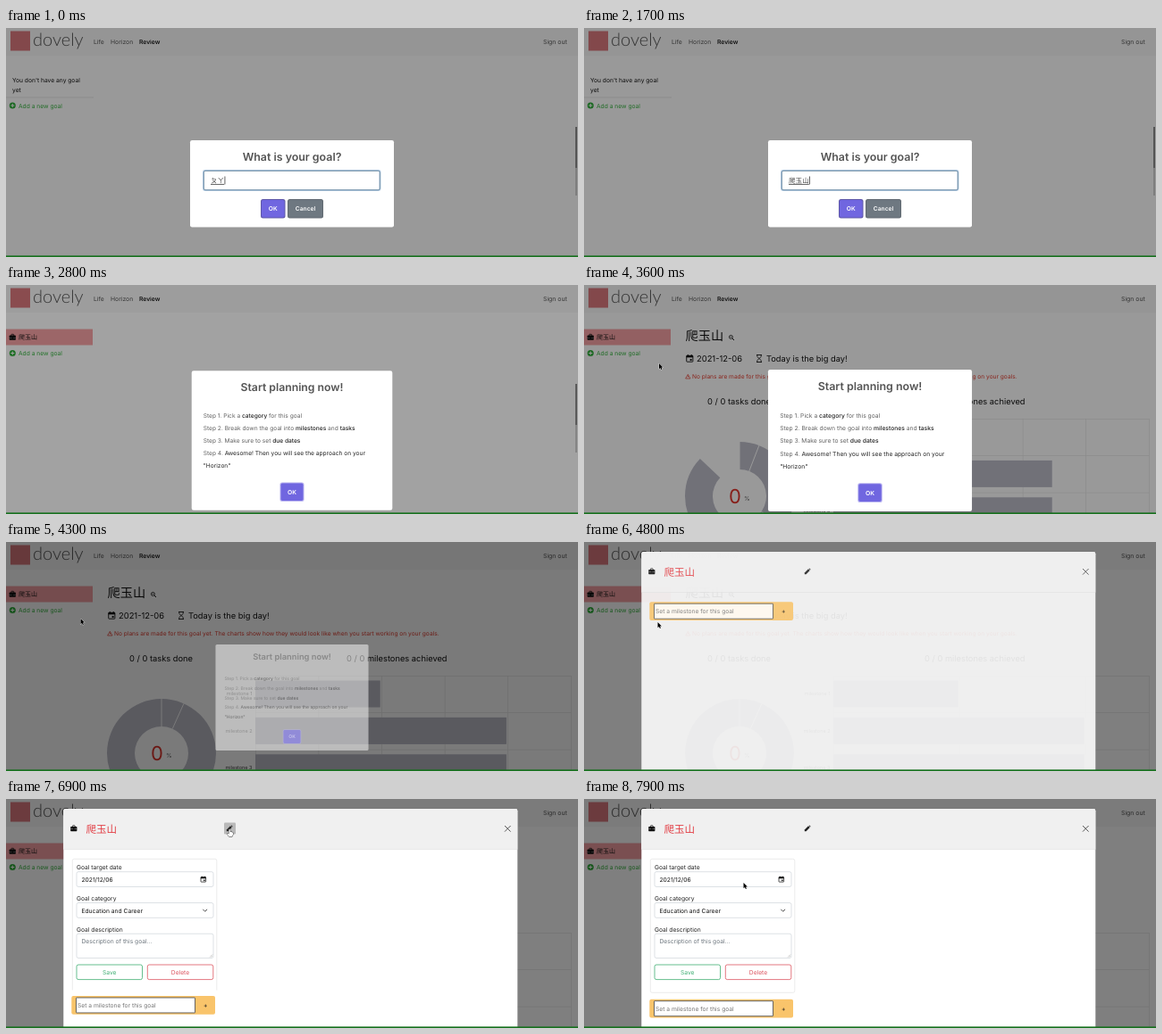
Recreate the animation shown at these times as an HTML page with a canvas. Size 640 px wide and 257 px high, loop 8000 ms.

```html
<!DOCTYPE html>
<html lang="en">
<head>
<meta charset="utf-8">
<title>Goal planner</title>
<style>
html, body { margin: 0; width: 100%; height: 100%; overflow: hidden; background: #fff; }
canvas { display: block; width: 640px; height: 257px; }
</style>
</head>
<body>
<canvas id="stage"></canvas>
<script>
const W = 640, H = 257, LOOP = 8000;
const canvas = document.getElementById('stage');
const ctx = canvas.getContext('2d');
const dpr = window.devicePixelRatio || 1;
canvas.width = W * dpr;
canvas.height = H * dpr;

const SANS = 'Inter, "Noto Sans CJK TC", "Noto Sans CJK SC", "Noto Sans CJK JP", "Noto Sans CJK", sans-serif';
const GOAL = '爬玉山';
const PURPLE = '#7066e0';

// ---------- timing ----------
const clamp = v => Math.max(0, Math.min(1, v));
const lerp = (a, b, k) => a + (b - a) * k;
const span = (t, from, to) => clamp((t - from) / (to - from));
const outQuart = k => 1 - Math.pow(1 - k, 4);

// CSS "ease", solved by bisection
function ease(x) {
  if (x <= 0 || x >= 1) return clamp(x);
  const bez = (s, a, b) => 3 * (1 - s) * (1 - s) * s * a + 3 * (1 - s) * s * s * b + s * s * s;
  let lo = 0, hi = 1;
  for (let i = 0; i < 20; i++) {
    const mid = (lo + hi) / 2;
    if (bez(mid, .25, .25) < x) lo = mid; else hi = mid;
  }
  return bez(lo, .1, 1);
}

const CLOSE_ASK = 2530, OPEN_STEPS = 2626, SHOW_CHARTS = 3200;
const CLOSE_STEPS = 4257, OPEN_MODAL = 4450, EXPAND = 6620;

// ---------- drawing helpers ----------
function text(str, x, y, size, color, { weight = 400, align = 'left', family = SANS } = {}) {
  ctx.font = `${weight} ${size}px ${family}`;
  ctx.fillStyle = color;
  ctx.textAlign = align;
  ctx.fillText(str, x, y);
  return ctx.measureText(str).width;
}

function rect(x, y, w, h, color) {
  ctx.fillStyle = color;
  ctx.fillRect(x, y, w, h);
}

function box(x, y, w, h, r, fill, stroke, line = .7) {
  ctx.beginPath();
  ctx.roundRect(x, y, w, h, r);
  if (fill) { ctx.fillStyle = fill; ctx.fill(); }
  if (stroke) { ctx.strokeStyle = stroke; ctx.lineWidth = line; ctx.stroke(); }
}

function path(points, color, width, close) {
  ctx.beginPath();
  points.forEach(([x, y], i) => i ? ctx.lineTo(x, y) : ctx.moveTo(x, y));
  if (close) ctx.closePath();
  ctx.strokeStyle = color;
  ctx.lineWidth = width;
  ctx.stroke();
}

function poly(points, fill, stroke, width = .6) {
  path(points, stroke || fill, stroke ? width : .01, true);
  ctx.fillStyle = fill;
  ctx.fill();
}

function at(x, y, scale, draw) {
  ctx.save();
  ctx.translate(x, y);
  ctx.scale(scale, scale);
  draw();
  ctx.restore();
}

// ---------- icons, centred on x, y ----------
function briefcase(x, y) {
  at(x, y, 1, () => {
    box(-1.4, -3.2, 2.8, 2, .5, null, '#111', .8);
    box(-3.6, -2, 7.2, 5.2, .7, '#111');
    rect(-3.6, .5, 2.8, .5, '#999');
    rect(.8, .5, 2.8, .5, '#999');
  });
}

function calendar(x, y, s) {
  at(x, y, s, () => {
    box(-3.1, -2.8, 6.2, 6, .5, null, '#111', .8);
    rect(-3.2, -3, 6.4, 2, '#111');
    rect(-2.2, -3.9, .9, 1.2, '#111');
    rect(1.3, -3.9, .9, 1.2, '#111');
    rect(.3, .4, 1.7, 1.7, '#111');
  });
}

function pencil(x, y) {
  at(x, y, 1, () => {
    poly([[-3.2, 3.2], [-3.2, 1.5], [1, -2.7], [2.7, -1], [-1.5, 3.2]], '#222');
    poly([[1.5, -3.1], [2.3, -3.6], [3.6, -2.3], [3.1, -1.5]], '#222');
  });
}

function hourglass(x, y) {
  path([[x - 3, y - 4], [x + 3, y - 4]], '#111', .9);
  path([[x - 3, y + 4], [x + 3, y + 4]], '#111', .9);
  path([[x - 2.2, y - 4], [x - 2.2, y - 2], [x + 2.2, y + 2], [x + 2.2, y + 4]], '#111', .8);
  path([[x + 2.2, y - 4], [x + 2.2, y - 2], [x - 2.2, y + 2], [x - 2.2, y + 4]], '#111', .8);
}

function magnifier(x, y) {
  ctx.beginPath();
  ctx.arc(x - .6, y - .6, 2, 0, 7);
  ctx.strokeStyle = '#111';
  ctx.lineWidth = .8;
  ctx.stroke();
  path([[x + .9, y + .9], [x + 3, y + 3]], '#111', 1);
  path([[x - 1.6, y - .6], [x + .4, y - .6]], '#111', .6);
}

function addGoal(y) {
  ctx.beginPath();
  ctx.arc(7.3, y, 3.5, 0, 7);
  ctx.fillStyle = '#2fae3a';
  ctx.fill();
  path([[5.3, y], [9.3, y]], '#fff', 1);
  path([[7.3, y - 2], [7.3, y + 2]], '#fff', 1);
  text('Add a new goal', 14, y + 2.6, 6.7, '#35b23f');
}

// ---------- page ----------
function navbar() {
  rect(0, 0, W, 31, '#f7f7f7');
  rect(5, 3.5, 22, 22, '#d9777c');
  text('dovely', 30, 19.8, 20, '#555', { weight: 300, family: 'Lato, sans-serif' });
  text('Life', 98, 17.5, 6.8, '#555');
  text('Horizon', 117, 17.5, 6.8, '#555');
  text('Review', 149, 17.5, 6.8, '#000', { weight: 500 });
  text('Sign out', 601, 17.5, 6.9, '#555');
}

function scrollbar() {
  rect(637, 111, 2, 77, '#cfcfcf');
  rect(637, 111, 2, 46, '#8c8c8c');
}

function sidebar(t) {
  if (t < OPEN_STEPS - 10) {
    text("You don't have any goal", 7, 61, 6.7, '#111');
    text('yet', 7, 72, 6.7, '#111');
    rect(0, 77.6, 98, .7, '#dcdcdc');
    addGoal(87);
  } else {
    rect(0, 49.5, 97, 18, '#f5a0a3');
    briefcase(7.3, 58.5);
    text(GOAL, 14, 61, 7, '#111');
    addGoal(76.5);
  }
}

const CHART = '#bcbcc8';

function donut(k) {
  const x = 174, y = 237, start = -Math.PI / 2, sweep = k * Math.PI * 2;
  ctx.beginPath();
  ctx.arc(x, y, 61, start, start + sweep);
  ctx.arc(x, y, 30, start + sweep, start, true);
  ctx.fillStyle = CHART;
  ctx.fill();
  for (const part of [0, .067, .4]) {
    const a = start + part * sweep, c = Math.cos(a), s = Math.sin(a);
    path([[x + 30 * c, y + 30 * s], [x + 61 * c, y + 61 * s]], '#fff', 1);
  }
  text('0', 162, 244.5, 22, '#e0342c');
  text('%', 179, 242, 6.8, '#666');
}

function bars(k) {
  const left = 279, step = 70.6, row = 41.4;
  for (let i = 0; i < 6; i++) rect(left + i * step, 150, .6, 107, '#e3e3e3');
  for (let i = 0; i < 3; i++) rect(left, 150 + i * row, step * 5, .6, '#e3e3e3');
  [2, 4, 4].forEach((units, i) => {
    rect(left, 155.5 + i * row, (units * step - 1.5) * k, 30, CHART);
    text('milestone ' + (i + 1), 275.5, 172.3 + i * row, 5.5, '#444', { align: 'right' });
  });
}

function goalPage(t) {
  const k = outQuart(span(t, SHOW_CHARTS, SHOW_CHARTS + 1000));
  text(GOAL, 113.5, 62, 14.2, '#111', { weight: 300 });
  magnifier(165, 59);
  calendar(118.3, 82.5, 1.15);
  text('2021-12-06', 126, 86, 9.4, '#111');
  hourglass(196, 82.5);
  text('Today is the big day!', 204, 86, 9.3, '#111');
  path([[113.6, 105], [116.3, 100.3], [119, 105]], '#e23b2e', .7, true);
  rect(116, 101.8, .7, 1.6, '#e23b2e');
  text('No plans are made for this goal yet. The charts show how they would look like when you start working on your goals.',
    121, 105, 6.6, '#e23b2e');
  text('0 / 0 tasks done', 138, 134, 9.3, '#111');
  text('0 / 0 milestones achieved', 381, 134, 9.3, '#111');
  donut(k);
  bars(k);
}

// ---------- dialogs ----------
function button(label, x, y, w, color, ring) {
  if (ring) box(x - 1, y - 1, w + 2, 21.5, 2.5, ring);
  box(x, y, w, 19.5, 1.8, color);
  text(label, x + w / 2, y + 12.3, 6.7, '#fff', { weight: 600, align: 'center' });
}

function popup(scale, alpha, draw) {
  if (alpha <= 0) return;
  ctx.save();
  ctx.globalAlpha = alpha;
  ctx.translate(320, 174.5);
  ctx.scale(scale, scale);
  ctx.translate(-320, -174.5);
  draw();
  ctx.restore();
}

// committed text, then text still being composed
const TYPING = [
  [0, '', 'ㄆㄚ'], [100, '', '爬'], [300, '', '爬ㄩ'], [600, '', '爬玉'],
  [800, '', '爬玉ㄕ'], [1000, '', '爬玉ㄕㄢ'], [1300, '', GOAL], [2000, GOAL, '']
];

function askGoal(t) {
  box(206, 126, 228, 97.5, 2.2, '#fff');
  text('What is your goal?', 320, 149, 12.4, '#545454', { weight: 600, align: 'center' });
  box(221, 160, 197.5, 22, 2, '#fff', 'rgba(100,150,200,.5)', 2);
  box(221.3, 160.3, 197, 21.5, 1.8, null, '#6d8799', .8);
  const [, done, draft] = TYPING.filter(([from]) => t >= from).pop();
  const a = text(done, 229, 173.8, 7.6, '#444');
  const b = text(draft, 229 + a, 173.8, 7.6, '#444');
  if (draft) rect(229, 175.2, b, .8, '#444');
  rect(229.4 + a + b, 166.5, .7, 9, '#222');
  button('OK', 286, 193, 25.5, PURPLE, '#5f58a8');
  button('Cancel', 316, 193, 38, '#6e7881', '#626a72');
}

function stepsDialog() {
  box(208, 96.5, 224, 156, 2.2, '#fff');
  text('Start planning now!', 320, 119.5, 12.2, '#545454', { weight: 600, align: 'center' });
  const lines = [
    ['Step 1. Pick a ', 'category', ' for this goal'],
    ['Step 2. Break down the goal into ', 'milestones', ' and ', 'tasks'],
    ['Step 3. Make sure to set ', 'due dates'],
    ['Step 4. ', 'Awesome! Then you will see the approach on your'],
    ['', '"Horizon"']
  ];
  lines.forEach((parts, row) => {
    let x = 221;
    parts.forEach((part, i) => {
      const strong = i % 2;
      x += text(part, x, 149.5 + row * 13.9, 6.6, strong ? '#222' : '#606060',
        { weight: strong && row < 3 ? 500 : 400 });
    });
  });
  button('OK', 307.5, 222.3, 25, PURPLE, '#b9b4f0');
}

function showScale(k) {
  if (k < .45) return lerp(.7, 1.05, ease(k / .45));
  if (k < .8) return lerp(1.05, .95, ease((k - .45) / .35));
  return lerp(.95, 1, ease((k - .8) / .2));
}

function dialogs(t) {
  if (t < CLOSE_ASK + 150) {
    const k = ease(span(t, CLOSE_ASK, CLOSE_ASK + 150));
    popup(1 - k / 2, 1 - k, () => askGoal(t));
  }
  if (t >= OPEN_STEPS && t < CLOSE_STEPS + 150) {
    const k = ease(span(t, CLOSE_STEPS, CLOSE_STEPS + 150));
    const shown = showScale(span(t, OPEN_STEPS, OPEN_STEPS + 300)) / .982;
    popup(shown * (1 - k / 2), (1 - k) * span(t, OPEN_STEPS, OPEN_STEPS + 60), stepsDialog);
  }
}

function dim(t) {
  if (t < OPEN_STEPS) return .4 * (1 - ease(span(t, CLOSE_ASK, CLOSE_ASK + 150)));
  const dialog = .4 * ease(span(t, OPEN_STEPS, OPEN_STEPS + 270));
  return dialog + .12 * span(t, CLOSE_STEPS, 4300) - .02 * span(t, 4350, 4500);
}

// ---------- goal modal ----------
function form() {
  box(74.3, 67.3, 161.5, 150, 2, '#fff', '#e2e2e2');
  const field = (label, y, h) => {
    text(label, 79, y, 6.7, '#222');
    box(79, y + 2.7, 153, h, 2, '#fff', '#ced4da');
  };
  field('Goal target date', 79, 16.8);
  text('2021/12/06', 84.5, 92.7, 6.7, '#111');
  calendar(220.8, 90.2, .9);
  field('Goal category', 113.8, 16.8);
  text('Education and Career', 84.5, 127.5, 6.7, '#111');
  path([[220.3, 123.8], [222.7, 126.2], [225.1, 123.8]], '#333', .9);
  field('Goal description', 148.5, 27.3);
  text('Description of this goal...', 84.5, 162.2, 6.7, '#6c757d');
  path([[228, 177.5], [231, 174.5]], '#999', .5);
  path([[229.6, 177.5], [231, 176.1]], '#999', .5);
  const action = (label, x, color) => {
    box(x, 186, 73.5, 16.6, 2, '#fff', color, .8);
    text(label, x + 36.7, 196.8, 6.7, color, { align: 'center' });
  };
  action('Save', 79, '#3fae72');
  action('Delete', 158.3, '#dc5560');
}

function milestoneRow(y) {
  box(73.3, y, 160.7, 20.8, 2, '#f9c46b');
  box(78.5, y + 2, 133, 17, .4, '#fff', '#555', .9);
  text('Set a milestone for this goal', 80, y + 13.2, 6.7, '#757575');
  text('+', 223.2, y + 13, 6.7, '#222', { weight: 500, align: 'center' });
}

function modal(t, hover) {
  const alpha = span(t, OPEN_MODAL, OPEN_MODAL + 400);
  if (!alpha) return;
  ctx.save();
  ctx.globalAlpha = alpha;
  ctx.translate(0, -21 * (1 - ease(span(t, OPEN_MODAL, OPEN_MODAL + 300))));
  box(64.3, 11, 508, 300, 2.2, '#fff');
  box(64.3, 11, 508, 45.3, [2.2, 2.2, 0, 0], '#f0f0f0');
  rect(64.3, 56, 508, .6, '#dedede');
  briefcase(75.8, 33);
  text(GOAL, 89.5, 37.8, 11.5, '#e23a40', { weight: 300 });
  if (hover) box(244, 26.5, 13, 13, 1.2, '#b9b9b9');
  pencil(250, 33);
  path([[558, 30], [564.6, 36.6]], '#444', .9);
  path([[564.6, 30], [558, 36.6]], '#444', .9);

  const open = ease(span(t, EXPAND, EXPAND + 350));
  if (open > 0) {
    ctx.save();
    ctx.beginPath();
    ctx.rect(64, 66, 200, 1 + 151 * open);
    ctx.clip();
    form();
    ctx.restore();
  }
  milestoneRow(67.2 + 157.5 * open);
  ctx.restore();
}

// ---------- pointer ----------
const ROUTE = [
  [3600, 84, 88], [4300, 83.5, 86], [4800, 82.5, 90], [5050, 82.5, 90], [5150, 100, 84],
  [5400, 200, 47], [5620, 264, 24], [5900, 251, 33], [6150, 250, 33.5], [7100, 250, 33.5],
  [7300, 240, 48], [7600, 203, 77], [7850, 178.5, 94], [8000, 178.5, 94]
];

function pointerAt(t) {
  const i = ROUTE.findIndex(([time]) => time > t);
  if (i < 1) return null;
  const [t0, x0, y0] = ROUTE[i - 1], [t1, x1, y1] = ROUTE[i];
  const k = span(t, t0, t1);
  return [lerp(x0, x1, k), lerp(y0, y1, k)];
}

function arrow() {
  poly([[0, 0], [0, 6.2], [1.4, 4.9], [2.4, 7.1], [3.4, 6.7], [2.5, 4.5], [4.4, 4.4]], '#000', '#fff', .7);
}

function hand() {
  poly([[-.5, .3], [.6, .3], [.9, 3.2], [3.8, 4], [4, 6], [3.2, 8.6], [-.6, 8.6], [-2.7, 5.4], [-2, 4.8], [-.5, 6]],
    '#fff', '#111', .8);
}

// ---------- frame ----------
function render(t) {
  ctx.setTransform(dpr, 0, 0, dpr, 0, 0);
  ctx.textRendering = 'geometricPrecision';
  ctx.lineJoin = 'round';
  rect(0, 0, W, H, '#fff');
  navbar();
  sidebar(t);
  if (t >= SHOW_CHARTS) goalPage(t); else scrollbar();
  rect(0, 0, W, H, `rgba(0,0,0,${dim(t)})`);

  const pointer = pointerAt(t);
  const hover = t > 5850 && t < 7230;
  modal(t, hover);
  dialogs(t);
  rect(0, 255.4, W, 1.6, '#14701c');
  if (pointer) at(pointer[0], pointer[1], 1, hover ? hand : arrow);
}

const begin = performance.now();
function tick() {
  render((performance.now() - begin) % LOOP);
  requestAnimationFrame(tick);
}
tick();
</script>
</body>
</html>
```
